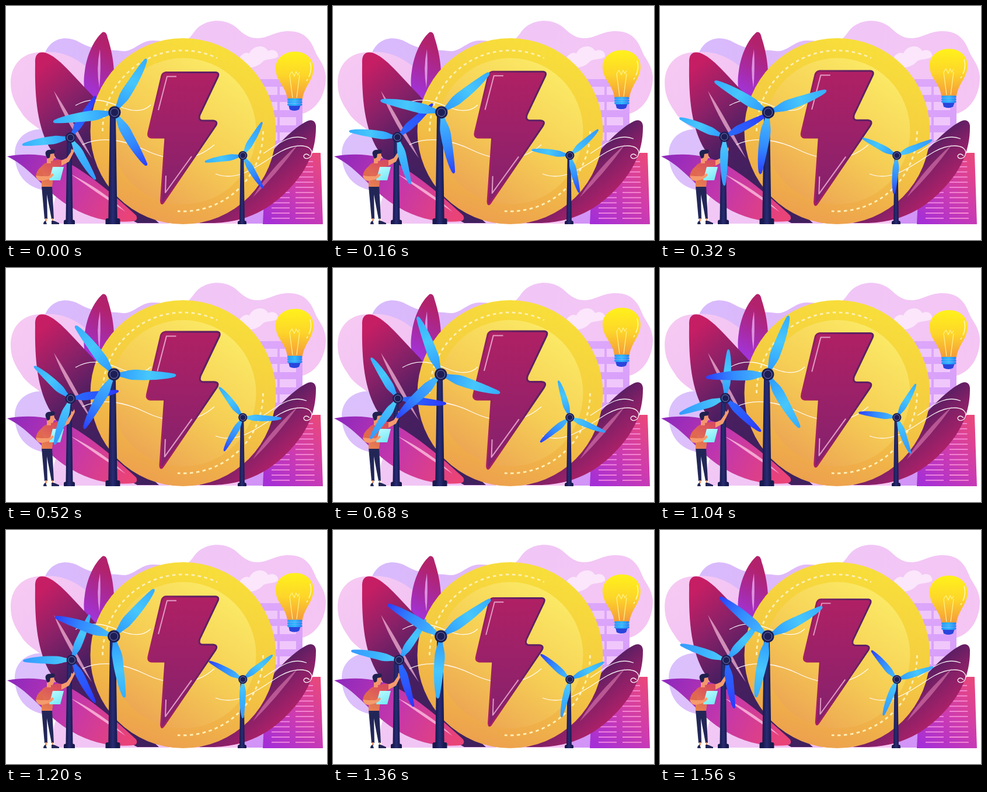
Animation, 550 px wide and 400 px high, one loop 1600 ms. Source, as an HTML page with a canvas:

```html
<!DOCTYPE html>
<html lang="en">
<head>
<meta charset="utf-8">
<title>Wind energy</title>
<style>
html, body { margin: 0; width: 100%; height: 100%; overflow: hidden; background: #fff; }
canvas { display: block; width: 550px; height: 400px; }
</style>
</head>
<body>
<canvas id="stage" width="550" height="400"></canvas>
<script>
const ctx = document.getElementById('stage').getContext('2d');
const LOOP = 1600, STEP = 40, RAD = Math.PI / 180;

// Smooth motion through a few poses, coming to rest at the last one.
const TIMES = [0, 320, 680, 840, 1040, 1200, 1560];
function track(values) {
  const last = TIMES.length - 1;
  const slope = i => i === last ? 0 :
    (values[i + 1] - values[Math.max(0, i - 1)]) / (TIMES[i + 1] - TIMES[Math.max(0, i - 1)]);
  return t => {
    let i = 0;
    while (i < last - 1 && t > TIMES[i + 1]) i++;
    const span = TIMES[i + 1] - TIMES[i];
    const u = Math.min(1, (t - TIMES[i]) / span), v = 1 - u;
    return v * v * (1 + 2 * u) * values[i] + u * v * v * span * slope(i) +
      u * u * (3 - 2 * u) * values[i + 1] - u * u * v * span * slope(i + 1);
  };
}

function lin(x0, y0, x1, y1, ...colors) {
  const g = ctx.createLinearGradient(x0, y0, x1, y1);
  colors.forEach((c, i) => g.addColorStop(i / (colors.length - 1), c));
  return g;
}
function fill(d, paint) {
  ctx.fillStyle = paint;
  ctx.fill(new Path2D(d));
}
function line(d, paint, width = 1.3) {
  ctx.strokeStyle = paint;
  ctx.lineWidth = width;
  ctx.stroke(new Path2D(d));
}
function disc(x, y, r, paint) {
  ctx.fillStyle = paint;
  ctx.beginPath();
  ctx.arc(x, y, r, 0, 7);
  ctx.fill();
}
function ring(x, y, r, paint, width, from = 0, to = 360) {
  ctx.strokeStyle = paint;
  ctx.lineWidth = width;
  ctx.beginPath();
  ctx.arc(x, y, r, from * RAD, to * RAD);
  ctx.stroke();
}

function drawClouds() {
  fill('M66 82C76 54 104 49 126 62C152 77 176 74 199 77C219 79 230 58 253 59C273 59 288 66 306 60L310 300L100 300Z',
    lin(66, 60, 300, 90, '#d8bbfd', '#dcb8fa', '#e7bdf7'));
  fill('M306 60C320 54 321 40 336 32C355 21 380 24 395 37C409 50 418 56 434 55C453 53 462 43 484 43C514 43 523 61 530 78C535 91 546 99 548 120C549 151 532 178 508 184L508 372L310 372Z',
    lin(330, 30, 520, 190, '#f0c6f6', '#f3c6f5', '#f5c5f3'));
  fill('M8 131C8 100 29 78 62 79C105 75 130 97 151 115L155 240L85 255C77 208 43 211 25 180C13 163 8 149 8 131Z',
    lin(10, 90, 130, 220, '#f6caf3', '#f1c0f3'));
  fill('M15 255C14 225 38 207 70 211C92 214 112 235 118 260L120 318L66 315C34 310 16 287 15 255Z',
    lin(15, 220, 110, 290, '#dac1fd', '#dfbdfa'));
  fill('M85 372C75 344 84 310 110 302L225 302L280 372Z',
    lin(80, 300, 260, 370, '#f2c9f5', '#efc0f5'));
  fill('M396 105C387 102 389 95 399 94C398 86 409 77 417 81C423 67 443 65 449 77C459 72 468 79 466 87C458 92 448 90 441 94C431 106 412 108 396 105Z',
    '#fbe6fb');
}

function drawTower() {
  fill('M433 125H480V141H508V372H400Z', lin(440, 125, 500, 370, '#dda7fb', '#d192f6'));
  ctx.fillStyle = '#f0c7fb';
  for (let y = 138; y < 230; y += 26) {
    ctx.fillRect(438, y, 27, 14);
    ctx.fillRect(469, y, 28, 14);
  }
}

function drawOffice() {
  fill('M440 373L442 333L486 272L526 251L539 251L543 373Z',
    lin(445, 365, 540, 258, '#a52fd6', '#ce3cae', '#e9487a'));
  for (let y = 266; y < 366; y += 8.8) {
    const lean = (y - 266) * .03;
    line(`M496 ${y}H${526 + lean}`, '#f78cd6', 1.8);
    line(`M455 ${y}H486`, '#f38ae2', 1.8);
  }
}

function drawBackLeaves() {
  fill('M164 46C169 42 173 47 174 54C185 87 190 126 180 175L160 180C137 162 130 143 135 111C139 82 151 58 164 46Z',
    lin(180, 75, 138, 145, '#b2226c', '#a82a9f', '#a233d8'));
  fill('M161 74Q154 106 160 140Q163 107 161 74Z', '#dd93e2');

  fill('M50 98C49 82 56 77 68 80C91 88 113 117 148 153C194 204 216 330 262 371L225 371C159 337 104 296 77 246C54 209 49 158 50 98Z',
    lin(52, 110, 185, 275, '#c61e64', '#8b2168', '#4c1e61', '#40205e'));
  fill('M82 145Q103 201 147 260Q112 190 82 145Z', 'rgba(240,178,213,.75)');

  fill('M330 371C390 356 405 302 449 256C475 227 500 203 518 196C526 193 532 199 531 208C531 246 516 278 493 304C465 336 425 369 357 371Z',
    lin(430, 250, 490, 320, '#4c1e61', '#872067', '#b32168'));
  fill('M501 236Q452 278 423 327Q465 286 501 236Z', 'rgba(214,118,172,.65)');
}

function drawCoin() {
  disc(303.5, 214, 159, lin(350, 58, 245, 365, '#f8df3a', '#f4ca42', '#eda04e'));
  disc(303.5, 214, 125, lin(375, 110, 235, 322, '#fbe965', '#f6cf55', '#eda653'));
  ctx.setLineDash([5.5, 5.5]);
  ring(303.5, 214, 138, '#fdf0b5', 2.8, 180, 295);
  ring(303.5, 214, 137, '#fdf0b5', 2.8, 0, 94);
  ctx.setLineDash([]);
}

function drawBolt(scale) {
  ctx.save();
  ctx.translate(303.5, 226);
  ctx.scale(scale, scale);
  ctx.translate(-303.5, -226);
  const shape = 'M274 113.5H359Q366 114 363 121L332 186Q329 195 336 196H355Q364 197 359 205L271 334Q266 342 265.5 333L273 225H249Q242 224 244 216L267 119Q269 114 274 113.5Z';
  fill(shape, lin(300, 112, 295, 338, '#b02064', '#992169', '#82216d'));
  line(shape, lin(245, 230, 345, 210, '#a92062', '#5d2064'), 3);
  line('M292 120.5H276L261 178M274 290L273 319L318 257', '#e19ac4', 2);
  ctx.restore();
}

function drawWind() {
  const air = 'rgba(255,255,255,.92)';
  line('M119 170C148 153 174 163 195 172C219 182 237 180 248 169', air);
  line('M131 237C165 221 205 230 238 246C275 264 320 270 357 237', air);
  line('M441 252C465 237 488 216 515 227', air);
  line('M359 287C400 303 437 268 470 249C495 235 521 236 524 250C523 263 510 263 510 256Q514 250 520 256', air);
}

function drawFrontLeaf() {
  fill('M2 257C42 250 84 254 117 274C152 295 191 328 223 358Q227 366 218 368C183 371 147 365 112 344C68 320 46 278 2 257Z',
    lin(15, 255, 211, 355, '#922abd', '#c437ab', '#e94378'));
  fill('M110 287Q165 314 205 352Q158 321 110 287Z', 'rgba(250,184,220,.85)');
}

function drawMast(x, top, half, base) {
  const navy = lin(x - half, 0, x + half, 0, '#171a4e', '#292c75', '#171a4e');
  fill(`M${x - half * .7} ${top}H${x + half * .7}L${x + half * 1.1} 368H${x - half * 1.1}Z`, navy);
  ctx.fillStyle = navy;
  ctx.beginPath();
  ctx.roundRect(x - base, 373 - base * .8, base * 2, base * .8, [3, 3, 0, 0]);
  ctx.fill();
}

function drawRotor(x, y, angle, size, tips) {
  ctx.save();
  ctx.translate(x, y);
  [0, 118, 230.5].forEach((offset, i) => {
    ctx.save();
    ctx.rotate((angle + offset) * RAD);
    ctx.scale(size / 107, size / 107);
    fill('M-3.5 -7C-4 -18 -9 -25 -8.5 -39C-7 -62 -5 -91 -2.5 -104Q0 -109 3 -104C8 -88 10 -57 9 -36C9 -25 5 -18 3.5 -7Z',
      lin(0, -12, 0, -107, ...tips[i]));
    ctx.restore();
  });
  const r = size * .075 + 2.6;
  disc(0, 0, r, '#1d1e55');
  ring(0, 0, r * .66, '#7d83bf', .9);
  ctx.restore();
}

function drawMan() {
  fill('M61 308H79L82 364H78L70 322L71 364H66Z', '#222657');
  fill('M67 363H70V368H67ZM79 363H81V368H79Z', '#f59b6d');
  fill('M64 373Q64 368 68 367L70 373ZM78 367H82L91 371V373H78Z', '#222657');
  fill('M61 274Q65 268 73 267L86 263L98 263L96 273L83 278L79 309H61Z',
    lin(85, 266, 62, 309, '#d84d5d', '#e88250'));
  fill('M95 264L104 260L111 250L112 244L114 246L117 241L118 246L115 252L108 266L95 273Z', '#f59b6d');
  fill('M61 274Q52 281 51 291L57 297L64 290Z', '#df684f');
  fill('M51 290Q53 299 61 299L79 295L81 291L61 291Z', '#f59b6d');
  fill('M80 275H99L93 298H74Z', lin(80, 275, 92, 298, '#b9faff', '#76e9f5'));
  fill('M70 293L80 286L82 289L77 294Z', '#f59b6d');
  fill('M70 254L82 250L83 257L84 259L82 261Q81 266 77 265L77 269L70 269Z', '#f4966c');
  fill('M69 257C65 249 70 245 77 246C83 243 86 248 82 252L76 253L75 259L71 261Z', '#20204f');
}

function drawBulb(top) {
  ctx.save();
  ctx.translate(0, top - 78);
  fill('M494 78C513 77 527 90 527 106C527 127 511 137 508 159H482C480 137 462 128 462 107C461 91 476 78 494 78Z',
    lin(494, 80, 494, 158, '#fff01c', '#fdd52a', '#f59b3a'));
  line('M491 157L486 118M498 157L503 118M486 118L490 112L494 120L497 112L500 118L503 113', '#fff38c', 1.2);
  line('M521 96Q525 108 519 121M517 125L515 128', '#fff6b0', 1.7);
  fill('M484 169H505L502 177Q494 181 486 177Z', '#2945dc');
  ctx.fillStyle = lin(482, 0, 508, 0, '#2997f4', '#32baff', '#287eef');
  for (let y = 158; y < 170; y += 4.2) {
    ctx.beginPath();
    ctx.roundRect(482, y, 25.5, 4, 2);
    ctx.fill();
  }
  ctx.restore();
}

const CYAN = ['#309fff', '#47c7fc', '#35adff'];
const SKY = ['#4bc8fc', '#3aafff', '#3699ff'];
const BLUE = ['#43b7ff', '#328bff', '#2b3dff'];
const DEEP = ['#2869fa', '#2c55ff', '#2d35fc'];

const bigAngle = track([30.7, 69.4, 107.3, 123.2, 149, 170, 191]);
const leftAngle = track([31, 62, 96, 110.5, 133, 151, 170.5]);
const rightAngle = track([30, 66, 112, 133, 159, 180, 200.5]);
const leftX = track([110.5, 110.3, 111, 111.8, 112, 112.6, 113.6]);
const leftY = track([225, 223.6, 223, 223, 222.5, 222.2, 222.5]);
const bigX = track([186, 185.5, 184.7, 184.8, 184.8, 184.8, 184.8]);
const boltScale = track([1, 1.022, 1.048, 1.038, 1.018, .998, .954]);
const bulbTop = track([78, 73.2, 68, 69.7, 72, 73.5, 78]);

function draw(t) {
  ctx.fillStyle = '#fff';
  ctx.fillRect(0, 0, 550, 400);
  ctx.lineCap = 'butt';
  ctx.lineJoin = 'round';
  drawClouds();
  drawTower();
  drawOffice();
  drawBackLeaves();
  drawCoin();
  drawWind();
  drawBolt(boltScale(t));
  drawFrontLeaf();
  drawMast(108.5, 226, 5.5, 9.5);
  drawMan();
  drawMast(183, 184, 7, 12.5);
  drawRotor(leftX(t), leftY(t), leftAngle(t), 84, [DEEP, SKY, CYAN]);
  drawRotor(bigX(t), 181.8, bigAngle(t), 107, [CYAN, BLUE, CYAN]);
  drawMast(404.5, 257, 4, 7.5);
  drawRotor(405.8, 255.5, rightAngle(t), 66.5, [SKY, BLUE, CYAN]);
  drawBulb(bulbTop(t));
}

const start = performance.now();
function tick(now) {
  const t = Math.max(0, now - start) % LOOP;
  draw(Math.floor(t / STEP) * STEP);
  requestAnimationFrame(tick);
}
draw(0);
requestAnimationFrame(tick);
</script>
</body>
</html>
```
